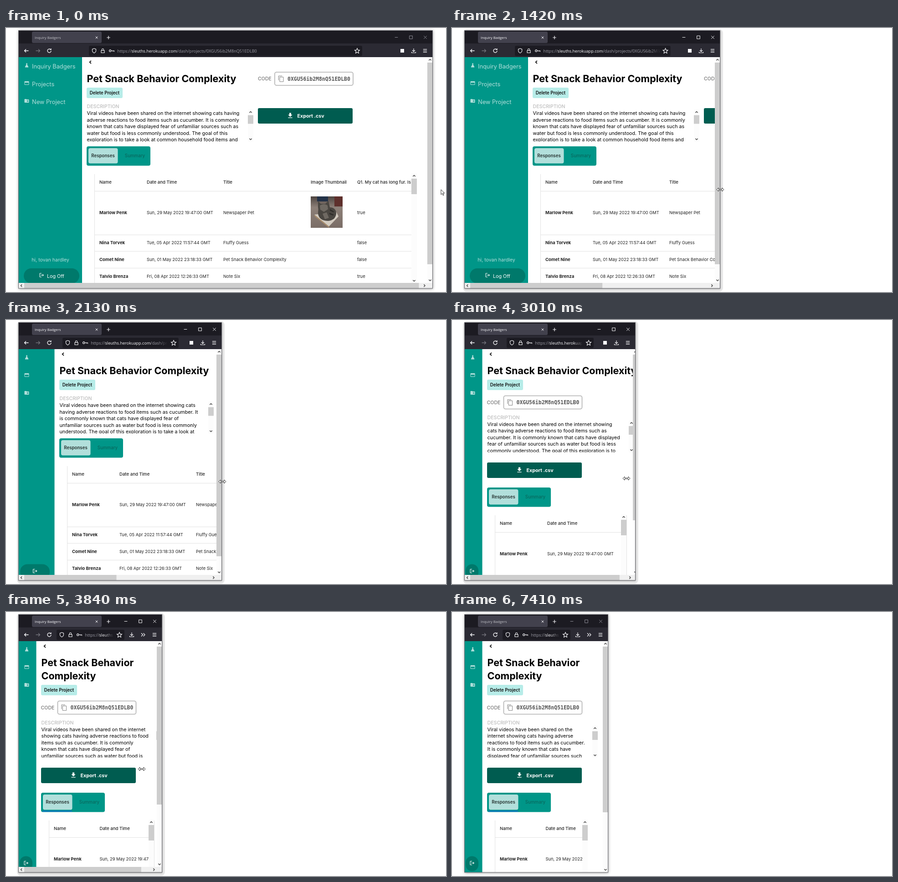
An HTML page with a canvas that plays this animation: 966x580 px, repeating every 7440 ms.

```html
<!DOCTYPE html>
<html lang="en">
<head>
<meta charset="utf-8">
<title>Responsive dashboard</title>
<style>
  html, body { margin: 0; width: 100%; height: 100%; overflow: hidden; background: #fff; }
  canvas { display: block; }
</style>
</head>
<body>
<canvas id="stage" width="966" height="580"></canvas>
<script>
const ctx = document.getElementById('stage').getContext('2d');
const LOOP = 7440, LEFT = 28, TOP = 64, BOTTOM = 572;
const SANS = 'Inter, sans-serif', CHROME = '"Open Sans", sans-serif', MONO = '"DejaVu Sans Mono", monospace';
const TEAL = '#009688', PALE = '#b2dfdb', LIGHT = '#fbfbfe', RULE = '#e2e2e2', THUMB = '#cdcdcd';

// Icons live in a 24 x 24 box.
const ICONS = Object.fromEntries(Object.entries({
  flask: 'M9 3h6v2h-1v4l5 9c1 2 0 3-1 3H6c-1 0-2-1-1-3l5-9V5H9z',
  card: 'M4 4h16a2 2 0 0 1 2 2v12a2 2 0 0 1-2 2H4a2 2 0 0 1-2-2V6a2 2 0 0 1 2-2zM4 10v8h16v-8z',
  folder: 'M10 4H4a2 2 0 0 0-2 2v12a2 2 0 0 0 2 2h16a2 2 0 0 0 2-2V8a2 2 0 0 0-2-2h-8zM15 9h2v3h3v2h-3v3h-2v-3h-3v-2h3z',
  logout: 'M5 5h7V3H5a2 2 0 0 0-2 2v14a2 2 0 0 0 2 2h7v-2H5zM17 7l-1.4 1.4L18.2 11H8v2h10.2l-2.6 2.6L17 17l5-5z',
  download: 'M19 9h-4V3H9v6H5l7 7zM5 18v2h14v-2z',
  copy: 'M16 1H4a2 2 0 0 0-2 2v14h2V3h12zM19 5H8a2 2 0 0 0-2 2v14a2 2 0 0 0 2 2h11a2 2 0 0 0 2-2V7a2 2 0 0 0-2-2zM19 21H8V7h11z',
  star: 'M12 2l3 7 7 .6-5.4 4.8L18.2 22 12 18l-6.2 4 1.6-7.6L2 9.6 9 9z',
  shield: 'M12 2l8 3v7c0 5-4 8-8 10-4-2-8-5-8-10V5z',
  lock: 'M5 11h14v10H5zM8 11V7a4 4 0 0 1 8 0v4',
  key: 'M2 12a4 4 0 1 0 8 0 4 4 0 1 0-8 0M10 12h12v4M17 12v3',
  reload: 'M20 12a8 8 0 1 1-2.5-5.8M20 2v5h-5',
  back: 'M21 12H3M10 5l-7 7 7 7',
  forward: 'M3 12h18M14 5l7 7-7 7',
  fetch: 'M12 2v14M6 10l6 6 6-6M3 17v4h18v-4',
  close: 'M5 5l14 14M19 5L5 19',
  plus: 'M12 3v18M3 12h18',
  minimize: 'M4 12h16',
  maximize: 'M4 4h16v16H4z',
  menu: 'M3 5h18M3 12h18M3 19h18',
  more: 'M4 5l7 7-7 7M13 5l7 7-7 7',
  left: 'M15 5l-7 7 7 7',
  right: 'M9 5l7 7-7 7',
  up: 'M5 15l7-7 7 7',
  down: 'M5 9l7 7 7-7'
}).map(([name, d]) => [name, new Path2D(d)]));
const RESIZE = new Path2D('M-8 0l4-4v3h8v-3l4 4-4 4v-3h-8v3z');
const ARROW = new Path2D('M0 0v11l2.6-2.4 2 4.2 1.7-.8-2-4.1h3.7z');

const DESCRIPTION = ('Viral videos have been shared on the internet showing cats having adverse reactions ' +
  'to food items such as cucumber. It is commonly known that cats have displayed fear of unfamiliar sources ' +
  'such as water but food is less commonly understood. The goal of this exploration is to take a look at ' +
  'common household food items and record how').split(' ');
const BRAND = 'Inquiry Badgers';
const PROJECT = ['Pet Snack Behavior', 'Complexity'];
const CODE = '0XGU56ib2M8nQ51EDLB0';
const HEADER = ['Name', 'Date and Time', 'Title', 'Image Thumbnail', 'Q1. My cat has long fur. Is this'];
const ROWS = [
  [67, 'Marlow Penk', 'Sun, 29 May 2022 19:47:00 GMT', 'Newspaper Pet', '', 'true'],
  [133, 'Nina Torvek', 'Tue, 05 Apr 2022 11:57:44 GMT', 'Fluffy Guess', '', 'false'],
  [170, 'Comet Nine', 'Sun, 01 May 2022 23:18:33 GMT', PROJECT.join(' '), '', 'false'],
  [207, 'Talvio Brenza', 'Fri, 08 Apr 2022 12:26:33 GMT', 'Note Six', '', 'true']
];

// Keys are [time, value]; linear in between.
const EDGE = [[620, 937], [930, 831], [970, 817], [1340, 589], [1420, 589], [1770, 474],
  [2790, 474], [2970, 409], [3010, 403], [3490, 343]];
const REFLOW = [[2790, 474], [3010, 423], [3840, 363], [4000, 343]];
const CURSOR_X = [[60, 955], [320, 938], [620, 938], [970, 776], [1340, 589], [1420, 589], [1770, 475],
  [2790, 475], [3010, 383], [3490, 349], [3540, 349], [3810, 298], [4130, 305], [4500, 305], [5190, 831], [5250, 848]];
const CURSOR_Y = [[2790, 355], [3010, 348], [3810, 345], [4500, 345], [5190, 569], [5250, 574]];
const URL_LEFT = [[343, 111], [403, 120], [474, 124], [817, 166], [937, 182]];
const URL_MARGIN = [[343, 83], [403, 92], [474, 95], [817, 138], [937, 155]];

function track(keys, t) {
  const i = keys.findIndex(key => key[0] > t);
  if (i === 0) return keys[0][1];
  if (i < 0) return keys[keys.length - 1][1];
  const [t0, a] = keys[i - 1], [t1, b] = keys[i];
  return a + (b - a) * (t - t0) / (t1 - t0);
}

function rect(x, y, w, h, color, radius = 0) {
  ctx.fillStyle = color;
  ctx.beginPath();
  ctx.roundRect(x, y, w, h, radius);
  ctx.fill();
}

// y is the middle of the capital letters.
function text(str, x, y, size, color, weight = 400, align = 'left', family = SANS) {
  ctx.font = `${weight} ${size}px ${family}`;
  ctx.textAlign = align;
  ctx.fillStyle = color;
  ctx.fillText(str, x, y + size * 0.36);
}

function icon(name, x, y, size, color, lineWidth = 0) {
  ctx.save();
  ctx.translate(x - size / 2, y - size / 2);
  ctx.scale(size / 24, size / 24);
  if (lineWidth) {
    ctx.strokeStyle = color;
    ctx.lineWidth = lineWidth * 24 / size;
    ctx.stroke(ICONS[name]);
  } else {
    ctx.fillStyle = color;
    ctx.fill(ICONS[name], 'evenodd');
  }
  ctx.restore();
}

function clipped(x, y, w, h, draw) {
  ctx.save();
  ctx.beginPath();
  ctx.rect(x, y, w, h);
  ctx.clip();
  draw();
  ctx.restore();
}

function verticalBar(x, top, bottom, thumbTop, thumbBottom, trackColor) {
  rect(x, top, 12, bottom - top, trackColor);
  rect(x, thumbTop, 12, thumbBottom - thumbTop, THUMB);
  icon('up', x + 6, top + 6, 9, '#505050', 1.5);
  icon('down', x + 6, bottom - 6, 9, '#505050', 1.5);
}

function wrap(words, width, size) {
  ctx.font = `400 ${size}px ${SANS}`;
  const lines = [''];
  for (const word of words) {
    const last = lines.length - 1;
    const joined = lines[last] ? lines[last] + ' ' + word : word;
    if (ctx.measureText(joined).width > width) lines.push(word);
    else lines[last] = joined;
  }
  return lines;
}

function drawShell(right, active) {
  if (active) rect(24, 3, right - 18, 576, '#e8e8e8', 8);
  ctx.save();
  ctx.shadowColor = 'rgba(0,0,0,.45)';
  ctx.shadowBlur = active ? 3 : 6;
  ctx.shadowOffsetY = 1;
  rect(LEFT, 5, right - LEFT, BOTTOM - 5, '#fff');
  ctx.restore();
}

function drawChrome(right, active) {
  const dim = active ? LIGHT : '#8f8f98';
  rect(LEFT, 5, right - LEFT, 29, '#1c1b22');
  rect(LEFT, 34, right - LEFT, 30, '#2b2a33');
  rect(57, 8, 153, 25, '#42414d', 3);
  text(BRAND, 63, 21, 7.8, active ? LIGHT : '#c4c4ca', 500, 'left', CHROME);
  icon('close', 199, 21, 8, LIGHT, 1);
  icon('plus', 225, 21, 10, LIGHT, 1.2);
  icon('minimize', right - 80, 20.5, 10, dim, 1);
  icon('maximize', right - 48, 20.5, 10, dim, 1);
  icon('close', right - 16.5, 20.5, 11, dim, 1);
  icon('back', 45, 50, 12, LIGHT, 1.3);
  icon('forward', 70, 50, 12, '#73727b', 1.3);
  icon('reload', 95, 50, 12, LIGHT, 1.3);

  const x = track(URL_LEFT, right), end = right - track(URL_MARGIN, right);
  rect(x, 39, end - x, 22.5, '#1c1b22', 3);
  icon('shield', x + 11.5, 50, 12, LIGHT, 1.1);
  icon('lock', x + 30.5, 50, 12, LIGHT, 1.1);
  icon('key', x + 50, 50, 13, LIGHT, 1.1);
  clipped(x + 60, 39, end - x - 84, 22, () => {
    let pen = x + 62.5;
    const parts = [['https://', '#9d9da6'], ['sleuths.herokuapp.com', LIGHT], ['/dash/projects/' + CODE, '#9d9da6']];
    for (const [part, color] of parts) {
      text(part, pen, 50.5, 9.1, color, 400, 'left', CHROME);
      pen += ctx.measureText(part).width;
    }
    const fade = ctx.createLinearGradient(end - 44, 0, end - 24, 0);
    fade.addColorStop(0, 'rgba(28,27,34,0)');
    fade.addColorStop(1, '#1c1b22');
    rect(end - 44, 40, 20, 20, fade);
  });
  icon('star', end - 11, 50, 13, LIGHT, 1.1);
  if (right < 373) {
    icon('fetch', right - 67, 50, 12, LIGHT, 1.2);
    icon('more', right - 42, 50, 12, LIGHT, 1.2);
  } else {
    rect(right - 71, 46, 8, 8, LIGHT);
    icon('fetch', right - 42, 50, 12, LIGHT, 1.2);
  }
  icon('menu', right - 17, 50, 11, LIGHT, 1.2);
}

function drawSidebar(width) {
  rect(LEFT, TOP, width, BOTTOM - TOP, TEAL);
  ['flask', 'card', 'folder'].forEach((name, i) => icon(name, 45.5, 82 + i * 39, 12, PALE));
  if (width > 100) {
    [BRAND, 'Projects', 'New Project'].forEach((label, i) => text(label, 57, 84 + i * 39, 12.8, PALE));
    text('hi, tovan hardley', 97.5, 509.5, 10.6, PALE, 400, 'center');
    rect(39, 528, 122, 33, '#00796b', 16.5);
    icon('logout', 78, 543, 12, '#fff');
    text('Log Off', 90, 545, 10.7, '#fff');
  } else {
    const w = width > 50 ? 65 : 28, x = width > 50 ? 31 : 30;
    rect(x, 536.5, w, 33, '#00796b', Math.min(16, w / 2));
    icon('logout', x + w / 2, 551.5, 12, '#fff');
  }
}

function drawPhoto(x, y) {
  clipped(x, y, 70, 69, () => {
    const floor = ctx.createLinearGradient(0, y, 0, y + 69);
    floor.addColorStop(0, '#4d4440');
    floor.addColorStop(0.35, '#8d8078');
    floor.addColorStop(1, '#7a6d66');
    rect(x, y, 70, 69, floor);
    rect(x + 14, y, 24, 11, '#243248');
    rect(x + 52, y, 18, 22, '#5e302c');
    const shape = (color, d) => {
      ctx.save();
      ctx.translate(x, y);
      ctx.fillStyle = color;
      ctx.fill(new Path2D(d));
      ctx.restore();
    };
    shape('#d3cbc0', 'M8 40L40 66 61 44 56 34z');
    shape('#a98d6c', 'M8 40L40 66v3L9 44z');
    shape('#4a4641', 'M16 10l6 6h10l7-6 3 14C56 24 60 38 52 48 42 58 22 54 18 44 14 36 18 32 16 24z');
    shape('#6f6962', 'M20 20c6-4 12-4 17 0l1 8-9 6-8-5zM26 38l9-3 5 12-9 3z');
    shape('#2e2b28', 'M42 28l9 5-1 2-8-4zM41 36l10 4-2 2-8-3z');
  });
}

function drawTable(x, header, right, column) {
  const columns = [27.5, column, 299.5, 491.5, 593.5].map(offset => x + offset);
  const start = Math.floor(x) + 17, end = right - 12;
  clipped(start, header - 18, end - start, 600, () => {
    rect(start, header - 18, 1, 600, RULE);
    HEADER.forEach((label, i) => text(label, columns[i], header, 9.6, '#222', 500));
    [19, 114.5, 151, 188].forEach(dy => rect(start, Math.round(header + dy), end - start, 1, RULE));
    for (const [dy, ...cells] of ROWS) {
      cells.forEach((cell, i) => text(cell, columns[i], header + dy, i ? 9.4 : 9.6, '#222', i ? 400 : 700));
    }
    drawPhoto(Math.floor(columns[3]), header + 31);
  });
}

function drawPage(view) {
  const { x, narrow, mid, twoLines, layout, trackColor, settled } = view;
  const extra = twoLines ? 29 : 0, edge = Math.floor(x);
  icon('left', x + 8, 75, 11, '#111', 1.8);
  if (twoLines) PROJECT.forEach((line, i) => text(line, x, 111 + i * 29, 21.5, '#000', 700));
  else text(PROJECT.join(' '), x, 111, 21.5, '#000', 700);

  rect(edge, 131 + extra, 79, 23, '#b7ece8', 3);
  text('Delete Project', x + 39, 142.5 + extra, 9.7, '#111', 600, 'center');

  const fullRight = edge + 366;
  const descRight = narrow ? layout - 23 : mid ? Math.min(fullRight, layout - 18) : fullRight;
  const codeX = narrow ? x - 1 : descRight + 10;
  const codeY = narrow ? 181 + extra : 111.5;
  text('CODE', codeX, codeY, 10.6, '#777', 500);
  ctx.strokeStyle = '#b0b0b0';
  ctx.lineWidth = 1.6;
  ctx.beginPath();
  ctx.roundRect(codeX + 37, codeY - 14.5, 172, 29, 4);
  ctx.stroke();
  icon('copy', codeX + 51, codeY, 15, '#999');
  text(CODE, codeX + 65, codeY, 11.46, '#555', 700, 'left', MONO);

  const descY = 187 + (narrow ? 41.5 + extra : 0);
  text('DESCRIPTION', x, descY - 14.5, 10.6, '#bdbdbd', 500);
  clipped(x, descY - 8, descRight - x, 70, () => {
    wrap(DESCRIPTION, descRight - x - 26, 10.7).slice(0, 5)
      .forEach((line, i) => text(line, x, descY + 0.5 + i * 14.5, 10.7, '#000'));
  });
  verticalBar(descRight - 12, descY - 8, descY + 63, descY + 4.5, descY + 23.5, trackColor);

  const exportX = narrow ? edge : descRight + 10;
  const exportY = narrow ? 313 + extra : 176;
  rect(exportX, exportY, 208, 34, '#005c50', 3);
  icon('download', exportX + 71, exportY + 16.5, 16, '#fff');
  text('Export .csv', exportX + 86.5, exportY + 17, 10.7, '#fff', 700);

  const tabY = narrow ? 368 + extra : 260;
  rect(edge, tabY, 140, 42.5, TEAL, 4);
  if (twoLines) rect(edge + 3, tabY + 39, 65, 3, '#0a78b8', 1);
  rect(edge + 4, tabY + 4, 64.5, 33.5, PALE, 4);
  text('Responses', x + 35.5, tabY + 21, 9.7, '#263230', 600, 'center');
  text('Summary', x + 105.5, tabY + 21, 9.7, '#08695e', 500, 'center');

  const header = narrow ? 447 + extra : 339;
  const tableRight = narrow ? layout - (settled ? 45 : 40) : edge + 725;
  drawTable(x, header, tableRight, twoLines ? 128 : 131.5);
  verticalBar(tableRight - 12, header - 20, header + 222, header - 8, header + 26, trackColor);
  if (narrow && !settled) rect(tableRight, header - 18, 1, 240, RULE);
}

function drawScrollbars(right, lagged, view) {
  const { narrow, mid, twoLines, trackColor, settled } = view;
  const floor = settled ? BOTTOM : 560;
  const thumbEnd = !narrow ? 519 : twoLines && !settled ? 423 : 440;
  verticalBar(lagged - 12, TOP, floor, 76, thumbEnd, trackColor);
  if (settled) return;
  rect(LEFT, 560, right - LEFT, 12, '#f0f0f0');
  const arrow = Math.min(right - 6, lagged - 18.5), length = arrow - 46;
  const content = twoLines ? 302 : narrow ? 362 : mid ? 828 : 1066 - 0.2 * right;
  rect(40, 560, Math.min(length, length * length / content), 12, THUMB);
  icon('left', 34, 566, 9, '#505050', 1.5);
  icon('right', arrow, 566, 9, '#505050', 1.5);
}

function drawCursor(t, stepped) {
  if (t >= 5310) return;
  const shape = t < 320 || t >= 4500 ? ARROW : RESIZE;
  ctx.save();
  ctx.translate(track(CURSOR_X, stepped), track(CURSOR_Y, stepped));
  ctx.fillStyle = '#fff';
  ctx.strokeStyle = '#222';
  ctx.lineWidth = 0.9;
  ctx.fill(shape);
  ctx.stroke(shape);
  ctx.restore();
}

function draw(t) {
  const stepped = Math.floor((t - 10) / 40) * 40 + 10;
  const right = Math.round(track(EDGE, stepped));
  const lagged = Math.round(track(EDGE, stepped - 40));
  const layout = stepped < 2790 ? right : Math.round(track(REFLOW, stepped));
  const active = t >= 620 && t < 7360;
  const narrow = layout < 431, mid = !narrow && layout < 566;
  const settled = t >= 4000;
  const view = {
    narrow, mid, layout, settled,
    twoLines: layout < 405,
    x: narrow ? 77.5 : mid ? 117.5 : 177.5,
    trackColor: settled && active ? '#f0f0f0' : '#fcfcfc'
  };

  rect(0, 0, 966, 580, '#fff');
  drawShell(right, active);
  clipped(LEFT, 5, right - LEFT, BOTTOM - 5, () => {
    drawPage(view);
    drawSidebar(narrow ? 38.5 : mid ? 78.5 : 139);
    drawScrollbars(right, lagged, view);
    drawChrome(right, active);
  });
  ctx.strokeStyle = '#66666c';
  ctx.lineWidth = 1;
  ctx.strokeRect(LEFT - 0.5, 5.5, right - LEFT, BOTTOM - 5.5);
  drawCursor(t, stepped);
}

function tick() {
  draw(performance.now() % LOOP);
  requestAnimationFrame(tick);
}
tick();
</script>
</body>
</html>
```
